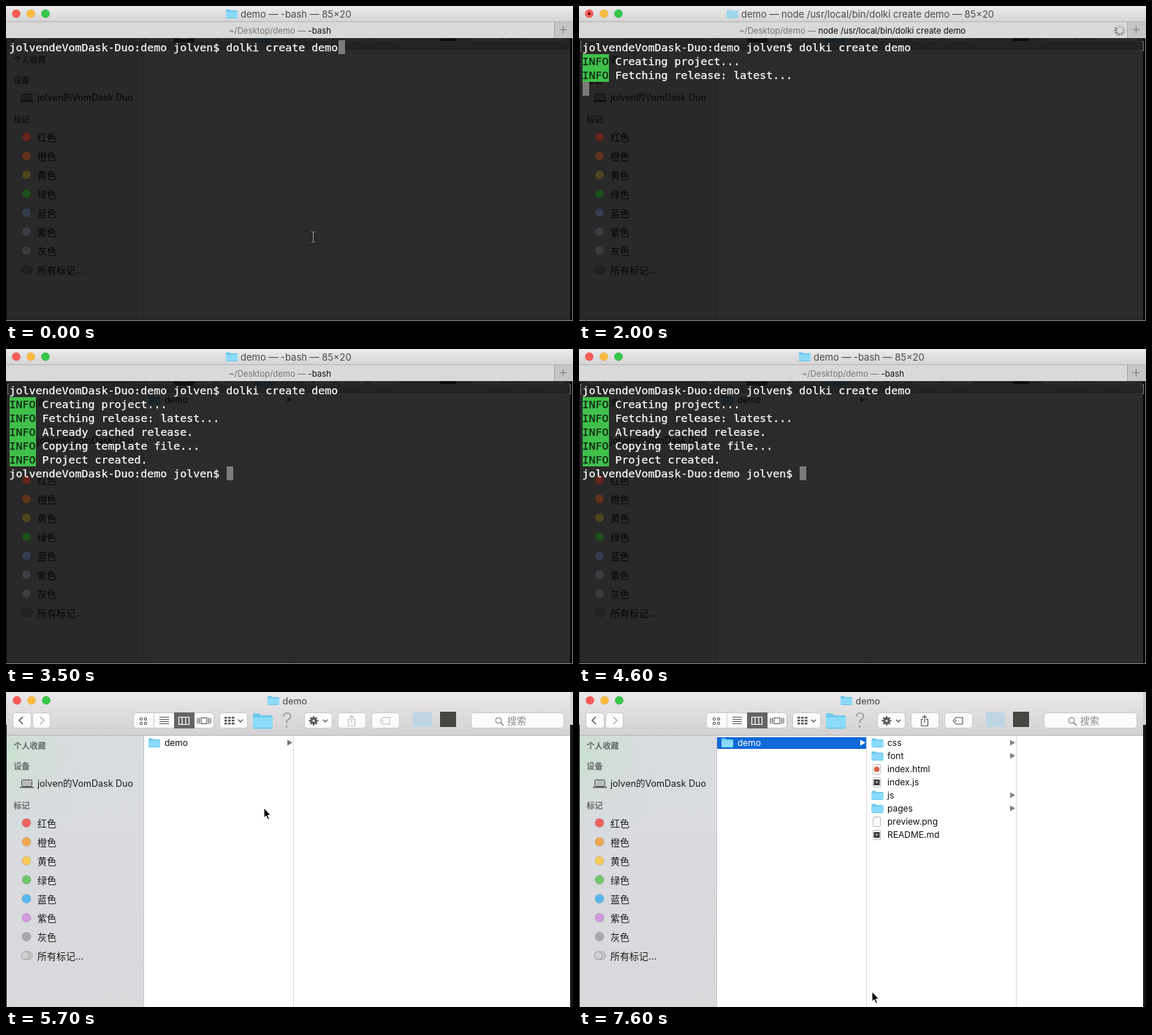
Recreate the animation shown at these times as an HTML page with a canvas. Size 776 by 432 pixels, loop 7.7 s.

```html
<!DOCTYPE html>
<html lang="zh-CN">
<head>
<meta charset="utf-8">
<style>
html, body { margin: 0; width: 100%; height: 100%; overflow: hidden; background: #000; }
canvas { display: block; }
</style>
</head>
<body>
<canvas id="stage" width="776" height="432"></canvas>
<script>
const ctx = document.getElementById('stage').getContext('2d');
const UI = 'Inter, "Noto Sans CJK SC", "Noto Sans CJK", sans-serif';
const MONO = '14.95px "DejaVu Sans Mono", monospace';
const LOOP = 7700, ENTER = 1000, DONE = 3000, SWITCH = 4700, CLICK = 6200;
const USER = 'jolven', HOST = 'VomDask', CMD = 'dolki create demo';
const PROMPT = `${USER}de${HOST}-Duo:demo ${USER}$ `;

function text(s, x, y, color = '#111', size = 12, weight = 400) {
  ctx.font = `${weight} ${size}px ${UI}`;
  ctx.fillStyle = color;
  ctx.fillText(s, x, y);
  return ctx.measureText(s).width;
}
function rect(x, y, w, h, color) {
  ctx.fillStyle = color;
  ctx.fillRect(x, y, w, h);
}
function round(x, y, w, h, r, fill, stroke) {
  ctx.beginPath();
  ctx.roundRect(x, y, w, h, r);
  paint(fill, stroke);
}
function paint(fill, stroke, width = 1) {
  if (fill) { ctx.fillStyle = fill; ctx.fill(); }
  if (stroke) { ctx.strokeStyle = stroke; ctx.lineWidth = width; ctx.stroke(); }
}
function dot(x, y, r, fill, stroke) {
  ctx.beginPath();
  ctx.arc(x, y, r, 0, Math.PI * 2);
  paint(fill, stroke);
}
function path(d, x, y, fill, stroke, width) {
  ctx.save();
  ctx.translate(x, y);
  const p = new Path2D(d);
  if (fill) { ctx.fillStyle = fill; ctx.fill(p); }
  if (stroke) { ctx.strokeStyle = stroke; ctx.lineWidth = width || 1; ctx.stroke(p); }
  ctx.restore();
}
function shade(x, y, w, h, top, bottom) {
  const g = ctx.createLinearGradient(0, y, 0, y + h);
  g.addColorStop(0, top);
  g.addColorStop(1, bottom);
  rect(x, y, w, h, g);
}
function lights(x, y) {
  ['#fb5d58', '#fcbb40', '#35c84b'].forEach((fill, i) => dot(x + 20 * i, y, 5.7, fill, 'rgba(0,0,0,.07)'));
}
function folder(x, y, w = 16) {
  ctx.save();
  ctx.translate(x, y);
  ctx.scale(w / 16, w / 16);
  path('M0 2Q0 .5 1.5 .5H5L6.5 2H14.5Q16 2 16 3.5V11.5Q16 13 14.5 13H1.5Q0 13 0 11.5Z', 0, 0, '#6cc8ec');
  rect(0, 3.7, 16, 8.3, '#8adbfa');
  ctx.restore();
}
const arrow = (x, y, color) => path('M0-4L7 0L0 4Z', x, y, color);

function page(x, y, mark) {
  round(x + 2.5, y - 6.5, 10, 13, 1, '#fbfbfb', '#bdbdbd');
  if (mark === 'code') {
    rect(x + 3.5, y - 4, 8, 8, '#3d3d3d');
    rect(x + 6, y - 2, 3, 3, '#999');
  }
  if (mark === 'web') dot(x + 7.5, y, 3.7, '#d9624c');
}

function toolbar(active) {
  const button = (x, w) => round(x + .5, 28.5, w - 1, 21, 4, '#fbfbfb', '#c9c7c9');
  const ink = '#585858', soft = active ? ink : '#bcbcbc';

  button(9, 26); button(36, 25);
  path('M4-5L-1 0L4 5', 19, 39, null, ink, 1.5);
  path('M-4-5L1 0L-4 5', 51, 39, null, '#b4b4b4', 1.5);

  button(174, 111);
  rect(202, 29, 1, 20, '#d2d2d2');
  rect(230, 28, 28, 22, '#656565');
  for (const x of [183, 189]) for (const y of [35, 41]) round(x + .5, y + .5, 3, 3, .5, null, ink);
  for (let i = 0; i < 4; i++) rect(210, 34 + 3 * i, 13, 1, ink);
  path('M-7-5H7V5H-7ZM-2.5-5V5M2.5-5V5', 243.5, 39.5, null, '#fff', 1.2);
  path('M-4-4H4V4H-4ZM-9-4V4M-6.5-4V4M6.5-4V4M9-4V4', 271, 39.5, null, ink, 1.1);

  button(292, 39);
  for (let i = 0; i < 9; i++) rect(299 + i % 3 * 5, 34 + (i / 3 | 0) * 4, 3.6, 2.5, ink);
  path('M-3-1.5L0 1.5L3-1.5', 321, 39.5, null, ink, 1.4);
  folder(338, 28.5, 27);
  text('?', 377.5, 49, '#a2a2a2', 29, 300);

  button(408, 39);
  for (let i = 0; i < 8; i++) {
    const a = i * Math.PI / 4, c = Math.cos(a), s = Math.sin(a);
    path(`M${c * 3} ${s * 3}L${c * 6.5} ${s * 6.5}`, 421, 39.5, null, ink, 2.2);
  }
  dot(421, 39.5, 4.5, ink);
  dot(421, 39.5, 1.6, '#fbfbfb');
  path('M-3-1.5L0 1.5L3-1.5', 437, 39.5, null, ink, 1.4);

  button(454, 39);
  path('M-2-3H-4.5V6H4.5V-3H2M0 2V-8M-3-5L0-8L3-5', 473, 40.5, null, soft, 1.1);
  button(500, 39);
  path('M-7 0L-3-4.5H6V4.5H-3Z', 519, 39.5, null, soft, 1.1);
  dot(515.5, 39.5, 1, soft);

  rect(557, 28, 26, 20, '#bdd5e5');
  rect(594, 27, 22, 21, '#484643');

  button(636, 128);
  dot(674, 39, 4, null, '#777');
  path('M0 0L4 4', 677, 42, null, '#777', 1.3);
  text('搜索', 686, 44, '#8b8b8b', 13);
}

// Label, colour, colour seen through the terminal
const TAGS = [
  ['红色', '#f0645f', '#66241b'], ['橙色', '#f2a851', '#60331a'],
  ['黄色', '#f8ca58', '#51451f'], ['绿色', '#70c969', '#1d4f1b'],
  ['蓝色', '#58b7f1', '#343d50'], ['紫色', '#d599e1', '#403c45'],
  ['灰色', '#a8a9ac', '#3c3c3c']
];
function tagDots(column) {
  TAGS.forEach((tag, i) => dot(28, 179.5 + 26 * i, 6, tag[column], column === 1 ? 'rgba(0,0,0,.13)' : null));
}

function sidebar(front) {
  if (front) {
    shade(1, 60, 188, 372, '#d9dce0', '#d9d9dc');
    const tint = ctx.createRadialGradient(1, 85, 0, 1, 85, 130);
    tint.addColorStop(0, '#c9e0cf');
    tint.addColorStop(1, 'rgba(217,220,224,0)');
    rect(1, 60, 188, 170, tint);
  } else {
    rect(1, 60, 188, 372, '#f5f5f5');
  }
  rect(188, 60, 1, 372, '#c8c8cb');
  [['个人收藏', 78], ['设备', 106], ['标记', 160]].forEach(([s, y]) => text(s, 10.5, y, '#656769', 11, 600));
  round(21.5, 120.5, 14, 9, 1, '#b9bcbd', '#555');
  rect(19, 130, 19, 1.5, '#555');
  text(`${USER}的${HOST} Duo`, 43, 130, '#1b1b1b', 12.5);
  tagDots(1);
  TAGS.forEach((tag, i) => text(tag[0], 43, 184.5 + 26 * i, '#1b1b1b', 13));
  dot(30.5, 361.5, 5.5, '#c9cacc', '#98999b');
  dot(26.5, 361.5, 5.5, '#cfd0d2', '#98999b');
  text('所有标记...', 43, 366.5, '#1b1b1b', 13);
}

const FILES = [['css'], ['font'], ['index.html', 'web'], ['index.js', 'code'],
  ['js'], ['pages'], ['preview.png', 'image'], ['README.md', 'code']];

function finder(t) {
  rect(0, 0, 776, 45, '#d2d2d2');
  rect(0, 45, 776, 387, '#171717');
  rect(1, 60, 771, 372, '#fff');
  shade(1, 0, 771, 60, '#ebe8eb', '#d3d1d3');
  rect(1, 59, 771, 1, '#b9b7b9');
  lights(15, 11.5);
  folder(358, 5);
  text('demo', 378.5, 16.5, '#444', 12.5);
  toolbar(t >= 6700);
  sidebar(t >= SWITCH);
  rect(393, 60, 1, 372, '#dadada');

  const open = t >= CLICK;
  if (t >= DONE) {
    if (open) rect(189, 62, 204, 16, '#1168d8');
    folder(195, 63);
    text('demo', 217, 74, open ? '#fff' : '#111');
    arrow(385, 69.5, open ? '#fff' : '#777');
  }
  if (open) {
    rect(598, 60, 1, 372, '#dadada');
    FILES.forEach(([name, mark], i) => {
      const y = 70 + 18 * i;
      if (mark) page(400, y, mark);
      else { folder(400.5, y - 7); arrow(590, y - .5, '#818181'); }
      text(name, 422, y + 4);
    });
  }
}

function mono(s, x, row, color = '#fff') {
  const y = 61.5 + 19 * row;
  ctx.font = MONO;
  ctx.fillStyle = ctx.strokeStyle = color;
  ctx.lineWidth = .25;
  ctx.fillText(s, x, y);
  ctx.strokeText(s, x, y);
}

const LOG = [[1800, 'Creating project...'], [1900, 'Fetching release: latest...'],
  [2300, 'Already cached release.'], [2400, 'Copying template file...'], [DONE, 'Project created.']];

function terminal(t) {
  rect(0, 44, 776, 388, 'rgba(0,0,0,.832)');
  tagDots(2);
  rect(0, 431, 776, 1, '#858585');
  rect(775, 44, 1, 388, '#858585');
  shade(0, 0, 776, 22, '#ebebeb', '#d4d4d4');
  rect(0, 21, 776, 1, '#b4b4b4');
  rect(0, 22, 776, 22, '#d9d9d9');
  rect(750, 22, 26, 22, '#c5c5c5');
  rect(750, 22, 1, 22, '#aaa');
  path('M-5 0H5M0-5V5', 762.5, 32.5, null, '#777', 1);
  lights(14, 10.5);

  const busy = t >= ENTER && t < DONE;
  if (busy) dot(14, 10.5, 2, '#68110e');
  const job = busy ? `node /usr/local/bin/${CMD}` : '-bash';
  ctx.globalAlpha = busy ? .45 : 1;
  folder(busy ? 202 : 301, 4);
  ctx.globalAlpha = 1;
  text(`demo — ${job} — 85×20`, busy ? 222 : 321, 15.5, '#4c4c4c', 13);
  const x = busy ? 219 : 305;
  const w = text('~/Desktop/demo — ', x, 37.5, '#777', 11.4);
  text(job, x + w, 37.5, '#111', 11.4);

  if (busy && t >= 2000) {
    const step = Math.floor(t / 100);
    for (let i = 0; i < 12; i++) {
      const a = i * Math.PI / 6, c = Math.cos(a), s = Math.sin(a);
      const fade = .2 + .8 * ((i - step % 12 + 12) % 12) / 11;
      path(`M${c * 4} ${s * 4}L${c * 7.5} ${s * 7.5}`, 740, 33.5, null, `rgba(60,60,60,${fade})`, 1.4);
    }
  }

  let row = 0, col = (PROMPT + CMD).length;
  mono(PROMPT + CMD, 4.5, 0);
  if (t >= ENTER) {
    path('M4 0H2.5V13H4M770.5 0H772.5V13H770.5', 0, 48.5, null, '#777');
    const lines = LOG.filter(l => t >= l[0]);
    lines.forEach(([, s], i) => {
      rect(5, 66 + 19 * i, 36, 19, '#40c04b');
      mono('INFO', 4.5, i + 1, '#0d240f');
      mono(s, 49.5, i + 1);
    });
    row = lines.length + 1;
    col = 0;
    if (!busy) {
      mono(PROMPT, 4.5, row);
      col = PROMPT.length;
    }
  } else {
    const beam = 'M-2.5-7.5Q0-7.5 0-5.5Q0-7.5 2.5-7.5M0-5.5V5.5M-2.5 7.5Q0 7.5 0 5.5Q0 7.5 2.5 7.5';
    path(beam, 420.5, 317, null, '#111', 2.6);
    path(beam, 420.5, 317, null, '#b5b5b5', 1);
  }
  rect(5 + 9 * col, 47 + 19 * row, 9, 19, '#7b7b7b');
}

// Pointer stops: time, x, y
const MOVES = [[5100, 421, 312], [5700, 353, 159], [6100, 365, 72], [6700, 365, 72],
  [7200, 396, 424], [7600, 401, 411]];

function pointer(t) {
  if (t < MOVES[0][0]) return;
  const i = Math.max(1, MOVES.findIndex(m => t <= m[0]));
  const [t0, x0, y0] = MOVES[i - 1], [t1, x1, y1] = MOVES[i];
  const k = (t - t0) / (t1 - t0), e = k * k * (3 - 2 * k);
  path('M0 0V13.5L3 10.8L5.2 15.8L7.4 14.8L5.2 10H9.4Z',
    x0 + (x1 - x0) * e, y0 + (y1 - y0) * e, '#000', '#fff', 1);
}

function draw(now) {
  const t = Math.floor(now % LOOP / 100) * 100;
  finder(t);
  if (t < SWITCH) terminal(t);
  else pointer(t);
  requestAnimationFrame(() => draw(performance.now()));
}
draw(performance.now());
</script>
</body>
</html>
```
